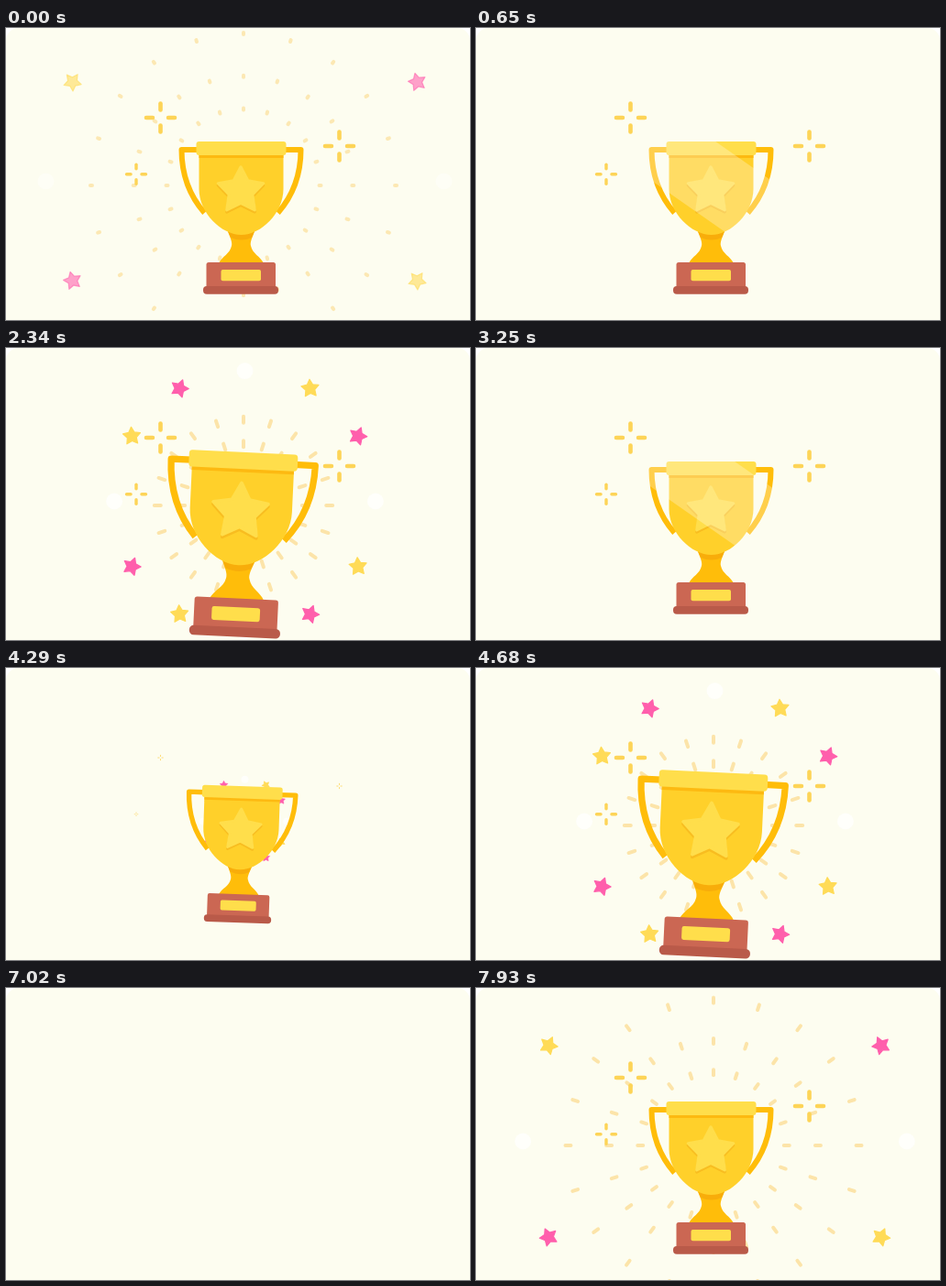
Recreate the animation shown at these times as an HTML page with a canvas. Size 506 by 319 pixels, loop 8 s.

```html
<!DOCTYPE html>
<html lang="en">
<head>
<meta charset="utf-8">
<title>Trophy</title>
<style>
html, body { margin: 0; width: 100%; height: 100%; overflow: hidden; background: #fff; }
canvas { display: block; }
</style>
</head>
<body>
<canvas id="stage" width="506" height="319"></canvas>
<script>
const W = 506, H = 319, LOOP = 8000, STEP = 130;
const ctx = document.getElementById('stage').getContext('2d');
const layer = document.createElement('canvas');
layer.width = W;
layer.height = H;
const cup = layer.getContext('2d');

const BG = '#fdfdf0', GOLD = '#ffd02a', LIGHT = '#ffde4b', AMBER = '#ffbd0a', PINK = '#ff5fac';
const AXIS = 256.5;

// Loop time -> phase of one cycle (0 is empty, 2100 is the trophy at rest).
const PHASE = [
  [0, 1120], [910, 2100], [1560, 2100], [1690, 0], [1820, 0],
  [1950, 200], [2730, 1100], [3250, 1851], [3380, 2100], [3510, 2100], [3640, 0], [3900, 0],
  [4030, 200], [4680, 650], [4810, 750], [4940, 750], [5070, 960], [5200, 1120],
  [5720, 1501], [6370, 2100], [6500, 2100], [6630, 0], [7020, 0],
  [7150, 170], [7670, 840], [7800, 840], [7930, 1000]
];

const clamp = x => Math.max(0, Math.min(1, x));
const ramp = (u, a, b) => clamp((u - a) / (b - a));
const smooth = x => x * x * (3 - 2 * x);
const rad = deg => deg * Math.PI / 180;

function phaseAt(t) {
  const i = PHASE.findIndex(k => k[0] >= t);
  if (i < 0) return PHASE[PHASE.length - 1][1];
  if (i === 0) return PHASE[0][1];
  const [t0, u0] = PHASE[i - 1], [t1, u1] = PHASE[i];
  return u0 + (u1 - u0) * (t - t0) / (t1 - t0);
}

// Decelerating distance that ends at phase 1180.
const reach = (u, max, span) => max * (1 - (1 - ramp(u, 1180 - span, 1180)) ** 2);

function star(c, x, y, r, turn, color, inner = 0.52) {
  c.beginPath();
  for (let i = 0; i < 10; i++) {
    const a = turn + i * Math.PI / 5, d = i % 2 ? r * inner : r;
    c.lineTo(x + d * Math.sin(a), y - d * Math.cos(a));
  }
  c.closePath();
  c.fillStyle = c.strokeStyle = color;
  c.lineWidth = r * 0.12;
  c.lineJoin = 'round';
  c.fill();
  c.stroke();
}

function box(c, x, y, w, h, r, color) {
  c.fillStyle = color;
  c.beginPath();
  c.roundRect(x, y, w, h, r);
  c.fill();
}

function line(c, x0, y0, x1, y1) {
  c.beginPath();
  c.moveTo(x0, y0);
  c.lineTo(x1, y1);
  c.stroke();
}

function shape(c, d, color) {
  c.fillStyle = color;
  c.fill(new Path2D(d));
}

function drawRays(u) {
  const len = Math.min(10, (1270 - u) / 30);
  if (u < 400 || len <= 0) return;
  ctx.save();
  ctx.translate(259, 172);
  ctx.strokeStyle = '#fce4a9';
  ctx.globalAlpha = clamp((1420 - u) / 350);
  ctx.lineWidth = 4;
  ctx.lineCap = 'round';
  const half = Math.max(0.5, len / 2 - 1.5);
  for (const max of [167, 120, 84]) {
    const r = reach(u, max, 800);
    for (let i = 0; i < 20; i++) {
      ctx.save();
      ctx.rotate(rad(i * 18));
      line(ctx, 0, -r - half, 0, -r + half);
      ctx.restore();
    }
  }
  ctx.restore();
}

// Twelve bits fly outward: stars, with a pale dot at each quarter.
function drawBits(u) {
  const alpha = clamp((1290 - u) / 290);
  if (u < 300 || !alpha) return;
  const r = reach(u, 218, 900), size = 10 * ramp(u, 280, 500);
  ctx.save();
  for (let i = 0; i < 12; i++) {
    const a = rad(i * 30);
    const x = 260.5 + r * Math.sin(a), y = 167.5 - r * Math.cos(a);
    if (i % 3 === 0) {
      ctx.globalAlpha = alpha * 0.7;
      ctx.fillStyle = '#fff';
      ctx.beginPath();
      ctx.arc(x, y, size * 0.9, 0, 7);
      ctx.fill();
    } else {
      const pink = [2, 5, 8, 11].includes(i);
      ctx.globalAlpha = alpha;
      star(ctx, x, y, size, rad(i * 24 + (u - 1000) * 0.08), pink ? PINK : '#ffdb57');
    }
  }
  ctx.restore();
}

function sparkle(x, y, r, width, scale) {
  ctx.save();
  ctx.translate(x, y);
  ctx.scale(scale, scale);
  ctx.strokeStyle = '#fdd457';
  ctx.lineWidth = width;
  ctx.lineCap = 'round';
  for (let i = 0; i < 4; i++) {
    line(ctx, 0, -r + width / 2, 0, -r * 0.35 - width / 2);
    ctx.rotate(Math.PI / 2);
  }
  ctx.restore();
}

function drawSparkles(u) {
  const s = smooth(ramp(u, 300, 600));
  if (!s) return;
  sparkle(168.5, 98, 17.8, 4.6, s);
  sparkle(363.5, 129, 17.8, 4.6, s);
  sparkle(142, 159.7, 12.2, 3.4, s);
}

function paintTrophy(c) {
  c.strokeStyle = AMBER;
  c.lineWidth = 6;
  c.lineJoin = 'round';
  for (const side of [-1, 1]) {
    c.save();
    c.translate(AXIS, 0);
    c.scale(side, 1);
    c.stroke(new Path2D('M46 133 H65 C65 164 54 186 40 202'));
    c.restore();
  }
  shape(c, 'M241 220 H272 C268 230 266 234 267 238 C269 247 277 249 281 257 H232 C236 249 244 247 246 238 C247 234 245 230 241 220Z', AMBER);
  shape(c, 'M242 222 H271 L268 229 Q256.5 234 245 229Z', '#f8ad0a');
  shape(c, 'M210.5 136 H302.5 V176 C302.5 202 278 226 256.5 226 C235 226 210.5 202 210.5 176Z', GOLD);
  box(c, 210.5, 137, 92, 5, 0, '#fdb911');
  box(c, 207.5, 124, 98, 15, 3, LIGHT);
  star(c, 256, 180, 26, 0, '#f8bd20');
  star(c, 256, 177.8, 26, 0, LIGHT);
  box(c, 218.5, 256, 75.5, 30, 2.5, '#cb6753');
  box(c, 215, 282, 82, 8.7, 4, '#b95a49');
  box(c, 234.5, 264, 43.5, 12.3, 2, LIGHT);
}

// Slanted light band that climbs from the lower left to the upper right.
function paintShine(c, u) {
  if (u <= 1400 || u >= 2100) return;
  const lead = -91 + 270 * ramp(u, 1400, 2100);
  c.save();
  c.globalCompositeOperation = 'source-atop';
  c.translate(256, 207);
  c.rotate(rad(35));
  c.fillStyle = 'rgba(255, 255, 255, 0.27)';
  c.fillRect(-300, -lead, 600, 75);
  c.restore();
}

function drawTrophy(u) {
  const grow = 1 - (1 - ramp(u, 150, 620)) ** 2;
  const settle = smooth(ramp(u, 650, 960));
  const scale = 1.21 * grow - 0.21 * settle;
  if (scale <= 0) return;
  cup.clearRect(0, 0, W, H);
  cup.save();
  cup.translate(AXIS, 172);
  cup.rotate(rad(2.7 * grow * (1 - settle)));
  cup.scale(scale, scale);
  cup.translate(-AXIS, -172);
  paintTrophy(cup);
  cup.restore();
  paintShine(cup, u);
  ctx.drawImage(layer, 0, 0);
}

function draw(now) {
  const t = Math.floor(now % LOOP / STEP) * STEP;
  const u = phaseAt(t);
  ctx.fillStyle = '#fff';
  ctx.fillRect(0, 0, W, H);
  box(ctx, 0, 0, W, H, [14, 14, 0, 0], BG);
  if (u > 0) {
    drawRays(u);
    drawBits(u);
    drawSparkles(u);
    drawTrophy(u);
  }
}

const start = performance.now();
function tick() {
  draw(performance.now() - start);
  requestAnimationFrame(tick);
}
tick();
</script>
</body>
</html>
```
